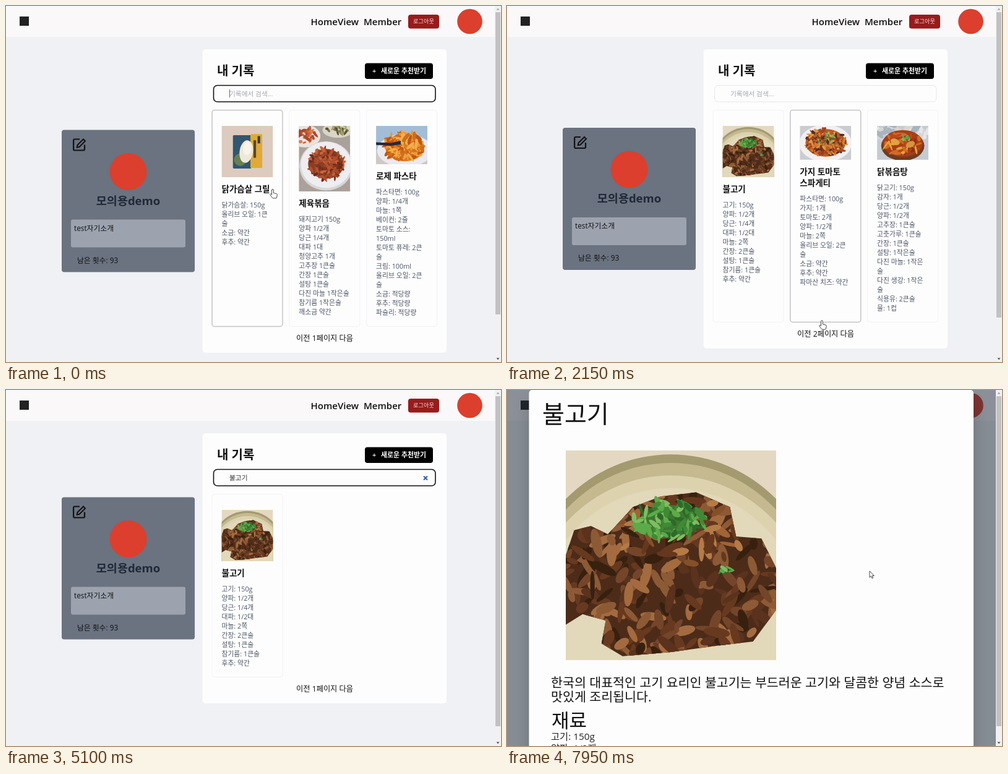
Recreate the animation shown at these times as an HTML page with a canvas. Size 800x576 px, loop 8 s.

```html
<!DOCTYPE html>
<html lang="ko">
<head>
<meta charset="utf-8">
<title>내 기록</title>
<style>
html, body { margin: 0; width: 100%; height: 100%; overflow: hidden; }
canvas { display: block; }
</style>
</head>
<body>
<canvas id="stage" width="800" height="576"></canvas>
<script>
const ctx = document.getElementById('stage').getContext('2d');
const LOOP = 8000;
const FONT = '"Open Sans", "Noto Sans CJK KR", "Noto Sans CJK", sans-serif';
const LOGO = '#dc3f2d';

// ---------- drawing helpers ----------
function text(str, x, y, size, color = '#111', weight = 400, align = 'left') {
  ctx.font = `${weight} ${size}px ${FONT}`;
  ctx.fillStyle = color;
  ctx.textAlign = align;
  ctx.fillText(str, x, y + size * 0.36);
}

function box(x, y, w, h, r, fill, stroke, line = 1) {
  ctx.beginPath();
  ctx.roundRect(x, y, w, h, r);
  if (fill) { ctx.fillStyle = fill; ctx.fill(); }
  if (stroke) { ctx.strokeStyle = stroke; ctx.lineWidth = line; ctx.stroke(); }
}

function oval(x, y, rx, ry, fill, angle = 0) {
  ctx.beginPath();
  ctx.ellipse(x, y, rx, ry, angle, 0, 7);
  ctx.fillStyle = fill;
  ctx.fill();
}

function shape(points, fill) {
  ctx.beginPath();
  for (let i = 0; i < points.length; i += 2) ctx.lineTo(points[i], points[i + 1]);
  ctx.closePath();
  ctx.fillStyle = fill;
  ctx.fill();
}

function stroke(path, color, width) {
  ctx.strokeStyle = color;
  ctx.lineWidth = width;
  ctx.stroke(path);
}

// Random food pieces spread over an oval
function scatter(cx, cy, rx, ry, colors, count, size, seed) {
  const rnd = () => (seed = seed * 16807 % 2147483647) / 2147483647;
  for (let i = 0; i < 5; i++) rnd();
  for (let i = 0; i < count; i++) {
    const a = rnd() * 6.283, r = Math.sqrt(rnd());
    oval(cx + Math.cos(a) * r * rx, cy + Math.sin(a) * r * ry,
      size * (0.6 + rnd()), size * (0.25 + rnd() * 0.3),
      colors[Math.floor(rnd() * colors.length)], rnd() * 3);
  }
}

// ---------- dishes, drawn 100 units wide ----------
const GREEN = ['#3f8a35', '#5cab48', '#2c6a2a', '#7fbd60'];

function bulgogi() {
  box(0, 0, 100, 100, 0, '#e4d8c2');
  oval(50, 75, 71, 73, '#a39a70');
  oval(50, 78, 69, 72, '#c4b98f');
  oval(50, 82, 68, 70, '#ddd2ae');
  oval(50, 84, 64, 66, '#e2d8ba');
  ctx.save();
  shape([0, 50, 4, 38, 12, 36, 20, 40, 32, 27, 45, 22, 62, 20, 78, 27, 81, 41, 93, 42, 100, 56,
    100, 76, 89, 91, 72, 93, 50, 96, 27, 98, 17, 92, 19, 81, 8, 78, 0, 83], '#4c2b19');
  ctx.clip();
  scatter(50, 60, 56, 42, ['#75452a', '#8d5a36', '#5a321d', '#a36b3f', '#38200f', '#67391f'], 300, 4.4, 71);
  scatter(56, 38, 34, 16, ['#a06437', '#845029', '#b57b47', '#65381d'], 50, 3.6, 12);
  ctx.restore();
  oval(49, 34, 14, 8, '#3d7730');
  scatter(49, 33, 17, 9, GREEN, 90, 2.4, 33);
  scatter(76, 57, 3, 2, GREEN, 8, 1.6, 5);
}

function chicken() {
  box(0, 0, 100, 100, 0, '#dccbbe');
  box(22, 18, 36, 65, 2, '#31566f');
  box(56, 16, 23, 66, 2, '#dfaa35');
  box(62, 28, 5, 34, 0, '#5a4526');
  box(70, 20, 5, 14, 0, '#333c45');
  oval(36, 66, 12, 12, '#688052');
  oval(48, 50, 13, 22, '#eee8db', 0.15);
  oval(50, 44, 8, 13, '#f8f4ea', 0.2);
}

function jeyuk() {
  box(0, 0, 100, 128, 0, '#aaa29a');
  oval(12, 20, 30, 22, '#e7e3de');
  scatter(10, 20, 24, 16, ['#c95f37', '#dc7d4c', '#a9482b'], 35, 6, 4);
  oval(76, 8, 30, 15, '#d9d5c9');
  scatter(76, 6, 22, 9, ['#777346', '#a79b6b', '#55532f'], 25, 5, 8);
  oval(53, 78, 52, 48, '#d7d6d8');
  oval(53, 76, 49, 45, '#eeedef');
  oval(53, 74, 35, 29, '#8c3d23');
  scatter(53, 74, 34, 29, ['#b2522e', '#823520', '#c9663a', '#6b2b1c', '#a5482a'], 130, 6, 21);
}

function rosePasta() {
  box(0, 0, 100, 75, 0, '#a3bdd6');
  box(0, 46, 100, 29, 0, '#cfc9c5');
  oval(56, 48, 54, 32, '#e9e9ef');
  oval(56, 42, 38, 27, '#da7a20');
  scatter(55, 40, 38, 26, ['#ed9633', '#d06d1b', '#f2ad4c', '#bf5716'], 120, 7, 17);
  shape([0, 32, 30, 33, 48, 29, 48, 36, 28, 39, 0, 37], '#282a36');
}

function spaghetti() {
  box(0, 0, 100, 66, 0, '#c9cdd1');
  oval(50, 34, 51, 36, '#f1eff0');
  oval(50, 33, 39, 27, '#b75d25');
  scatter(50, 33, 39, 27, ['#d67b2e', '#a64420', '#4f2a25', '#e09a45', '#7b3320'], 130, 5, 9);
  scatter(52, 24, 18, 13, GREEN, 18, 3, 15);
}

function stew() {
  box(0, 0, 100, 66, 0, '#c5cbd0');
  scatter(50, 10, 55, 16, ['#e5e6e8', '#a8b4c0', '#d8d6d3'], 30, 12, 3);
  oval(50, 39, 42, 29, '#6c3c25');
  oval(50, 34, 39, 26, '#a93d17');
  scatter(50, 34, 35, 21, ['#d36b25', '#b54a1b', '#8f3015', '#e2a33d'], 45, 7, 44);
  oval(35, 31, 9, 6, '#dfa341', 0.4);
  oval(65, 36, 9, 6, '#d8943a', -0.4);
  scatter(53, 23, 9, 5, GREEN, 14, 3, 6);
}

function photo(dish, x, y, w, h) {
  ctx.save();
  ctx.beginPath();
  ctx.rect(x, y, w, h);
  ctx.clip();
  ctx.translate(x, y);
  ctx.scale(w / 100, w / 100);
  dish();
  ctx.restore();
}

// ---------- content ----------
const recipe = (dish, height, title, items) =>
  ({ dish, height, title: title.split('|'), items: items.split('|') });

const bulgogiCard = recipe(bulgogi, 83, '불고기',
  '고기: 150g|양파: 1/2개|당근: 1/4개|대파: 1/2대|마늘: 2쪽|간장: 2큰술|설탕: 1큰술|참기름: 1큰술|후추: 약간');

const firstPage = { number: 1, bottom: 519, thumb: 499, cards: [
  recipe(chicken, 83, '닭가슴살 그릴', '닭가슴살: 150g|올리브 오일: 1큰|술|소금: 약간|후추: 약간'),
  recipe(jeyuk, 106, '제육볶음',
    '돼지고기 150g|양파 1/2개|당근 1/4개|대파 1대|청양고추 1개|고추장 1큰술|간장 1큰술|설탕 1큰술|다진 마늘 1작은술|참기름 1작은술|깨소금 약간'),
  recipe(rosePasta, 62, '로제 파스타',
    '파스타면: 100g|양파: 1/4개|마늘: 1쪽|베이컨: 2줄|토마토 소스:|150ml|토마토 퓨레: 2큰|술|크림: 100ml|올리브 오일: 2큰|술|소금: 적당량|후추: 적당량|파슬리: 적당량')
] };
const secondPage = { number: 2, bottom: 512, thumb: 504, cards: [
  bulgogiCard,
  recipe(spaghetti, 55, '가지 토마토|스파게티',
    '파스타면: 100g|가지: 1개|토마토: 2개|양파: 1/2개|마늘: 2쪽|올리브 오일: 2큰|술|소금: 약간|후추: 약간|파마산 치즈: 약간'),
  recipe(stew, 55, '닭볶음탕',
    '닭고기: 150g|감자: 1개|당근: 1/2개|양파: 1/2개|고추장: 1큰술|고춧가루: 1큰술|간장: 1큰술|설탕: 1작은술|다진 마늘: 1작은|술|다진 생강: 1작은|술|식용유: 2큰술|물: 1컵')
] };
const resultPage = { number: 1, bottom: 465, thumb: 544, cards: [bulgogiCard] };

// ---------- timeline ----------
const MODAL_AT = 6550;
const keys = [[3450, 'ㅂ'], [3600, '부'], [3700, '불'], [3850, '불ㄱ'], [3950, '불고'], [4100, '불곡'], [4250, '불고기']];
const pointerPath = [[0, 431, 297], [150, 431, 297], [800, 549, 537], [1800, 549, 537], [2050, 525, 495],
  [2300, 480, 535], [2500, 480, 535], [2700, 412, 174], [2950, 400, 145], [5650, 400, 145],
  [6050, 396, 311], [7650, 396, 311], [7950, 586, 293], [LOOP, 586, 293]];

const clamp = v => Math.max(0, Math.min(1, v));

function pointerAt(t) {
  const i = pointerPath.findIndex(p => p[0] > t);
  const [t0, x0, y0] = pointerPath[i - 1], [t1, x1, y1] = pointerPath[i];
  const k = (t - t0) / (t1 - t0), e = k * k * (3 - 2 * k);
  return { x: x0 + (x1 - x0) * e, y: y0 + (y1 - y0) * e };
}

function pageAt(t) {
  if (t >= 4600) return resultPage;
  return t >= 1050 && t < 2500 ? secondPage : firstPage;
}

function caretVisible(t) {
  if (t < 1050) return t < 250 || t > 800;
  return t < 4550 || (t - 4550) % 1100 < 550;
}

// ---------- parts ----------
const cardX = i => 332.5 + i * 124.8;
const hand = new Path2D('M-1.5 1a1.4 1.4 0 0 1 2.9 0v4.6l4.8 1.2q1.4.5 1.1 2l-.8 4.2q-.3 1-1.3 1h-4.4q-.8 0-1.3-.7l-3.6-4.7q-.6-1 .5-1.5.8-.1 1.5.6l.6.7z');
const arrow = new Path2D('M0 0V10.3L2.4 8.1 4 11.8 5.7 11 4.1 7.5H7.4Z');
const editSquare = new Path2D('M11 2H3Q1.1 2 1.1 4V18Q1.1 20 3 20H17Q19 20 19 18V11');
const editPencil = new Path2D('M7.5 11.5L17 2 20 5 10.5 14.5 6.7 15.3Z');
const cross = new Path2D('M675 139.500l6 6m0-6l-6 6');

function header() {
  box(0, 0, 790, 50, 0, '#faf8f9');
  box(22, 17, 15, 15, 0, '#222');
  text('HomeView', 492.5, 26, 15, '#111', 600);
  text('Member', 578, 26, 15, '#111', 600);
  box(650, 14, 50, 22.5, 4, '#991b1b');
  text('로그아웃', 675, 25, 9.2, '#f5dede', 400, 'center');
  oval(749.5, 25, 20.3, 20.3, LOGO);
}

function profile(panelBottom) {
  const top = (70 + panelBottom) / 2 - 115;
  box(90, top, 215, 230, 4, '#6b7280');
  ctx.save();
  ctx.translate(108, top + 13);
  stroke(editSquare, '#111', 2.2);
  stroke(editPencil, '#111', 2);
  ctx.restore();
  oval(197.5, top + 67.5, 30, 30, LOGO);
  text('모의용demo', 197.5, top + 114.5, 18.5, '#1f2937', 700, 'center');
  box(105, top + 145, 185, 45, 3, '#9ca3af');
  text('test자기소개', 110, top + 159, 11.8);
  text('남은 횟수: 93', 115, top + 211, 11.8);
}

function search(t) {
  const focused = t < 1050 || t >= 3150;
  const typed = keys.reduce((now, [at, value]) => t >= at ? value : now, '');
  box(335.5, 128.500, 358.5, 26.5, 6, '#fefdfe', focused ? '#111' : '#e6e7eb', focused ? 1.6 : 1);
  text(typed || '기록에서 검색...', 361, 142, 10.7, typed ? '#333' : '#a3a6ad');
  if (focused && caretVisible(t)) {
    const width = typed ? ctx.measureText(typed).width : 0;
    box(361 + width, 135, 0.8, 13, 0, '#444');
  }
  if (typed) stroke(cross, '#2a5da8', 1.9);
}

function card({ dish, height, title, items }, x, bottom, hovered) {
  box(x + 0.5, 168.5, 114, bottom - 169, 4, '#fefdfe', hovered ? '#c3c4c8' : '#f1f1f4', hovered ? 1.5 : 1);
  photo(dish, x + 16, 194, 83, height);
  let y = 194 + height + 19;
  for (const line of title) { text(line, x + 16, y, 13.5, '#111', 700); y += 18; }
  y += 8;
  for (const line of items) { text(line, x + 16, y, 10.8, '#4b5563'); y += 15; }
}

function scrollbar(thumb) {
  box(790, 0, 10, 576, 0, '#f1f1f1');
  box(791, 10, 8, thumb - 10, 0, '#c1c1c1');
  shape([792.5, 6.5, 795, 3.5, 797.5, 6.5], '#a3a3a3');
  shape([792.5, 569.5, 795, 572.5, 797.5, 569.5], '#505050');
}

function modal(alpha) {
  ctx.save();
  ctx.globalAlpha = alpha;
  box(0, 0, 790, 576, 0, 'rgba(31, 41, 55, .5)');
  ctx.shadowColor = 'rgba(0, 0, 0, .18)';
  ctx.shadowBlur = 22;
  ctx.shadowOffsetY = 16;
  box(35.5, 0, 718.5, 590, 5, '#fefdfe');
  ctx.shadowColor = 'transparent';
  text('불고기', 57, 39, 39);
  photo(bulgogi, 95, 97.5, 340, 339.5);
  text('한국의 대표적인 고기 요리인 불고기는 부드러운 고기와 달콤한 양념 소스로', 71, 474, 20.6);
  text('맛있게 조리됩니다.', 71, 496.5, 20.6);
  text('재료', 72, 535, 31);
  text('고기: 150g', 71, 560.5, 15.3, '#222');
  text('양파: 1/2개', 71, 579, 15.3, '#222');
  ctx.restore();
}

function pointer(path, { x, y }) {
  ctx.save();
  ctx.translate(x, y);
  ctx.fillStyle = '#fff';
  ctx.fill(path);
  stroke(path, '#333', 0.9);
  ctx.restore();
}

function draw(t) {
  const page = pageAt(t), { bottom } = page, mouse = pointerAt(t);
  const hovered = page.cards.findIndex((_, i) =>
    mouse.x > cardX(i) && mouse.x < cardX(i) + 114.5 && mouse.y > 168 && mouse.y < bottom);
  const overText = mouse.y > 128 && mouse.y < 156 ||
    mouse.x > 465 && mouse.x < 565 && mouse.y > bottom + 8;

  box(0, 0, 800, 576, 0, '#eff1f4');
  header();
  profile(bottom + 42);
  box(317.5, 70, 394.5, bottom - 28, 5, '#fefdfe');
  text('내 기록', 341, 105, 20, '#111', 700);
  box(580, 92.5, 110, 25.5, 4, '#000');
  text('+', 592, 105, 10.9, '#fff', 600);
  text('새로운 추천받기', 606, 105, 10.9, '#fff', 700);
  search(t);
  page.cards.forEach((c, i) => card(c, cardX(i), bottom, i === hovered));
  text(`이전 ${page.number}페이지 다음`, 515, bottom + 19, 12.2, '#111', 400, 'center');
  if (t >= MODAL_AT) modal(clamp((t - MODAL_AT + 10) / 100));
  scrollbar(page.thumb);

  if (t >= MODAL_AT) pointer(arrow, mouse);
  else if (hovered >= 0) pointer(hand, mouse);
  else if (!overText) pointer(arrow, mouse);
}

function tick() {
  draw(performance.now() % LOOP);
  requestAnimationFrame(tick);
}
tick();
</script>
</body>
</html>
```
